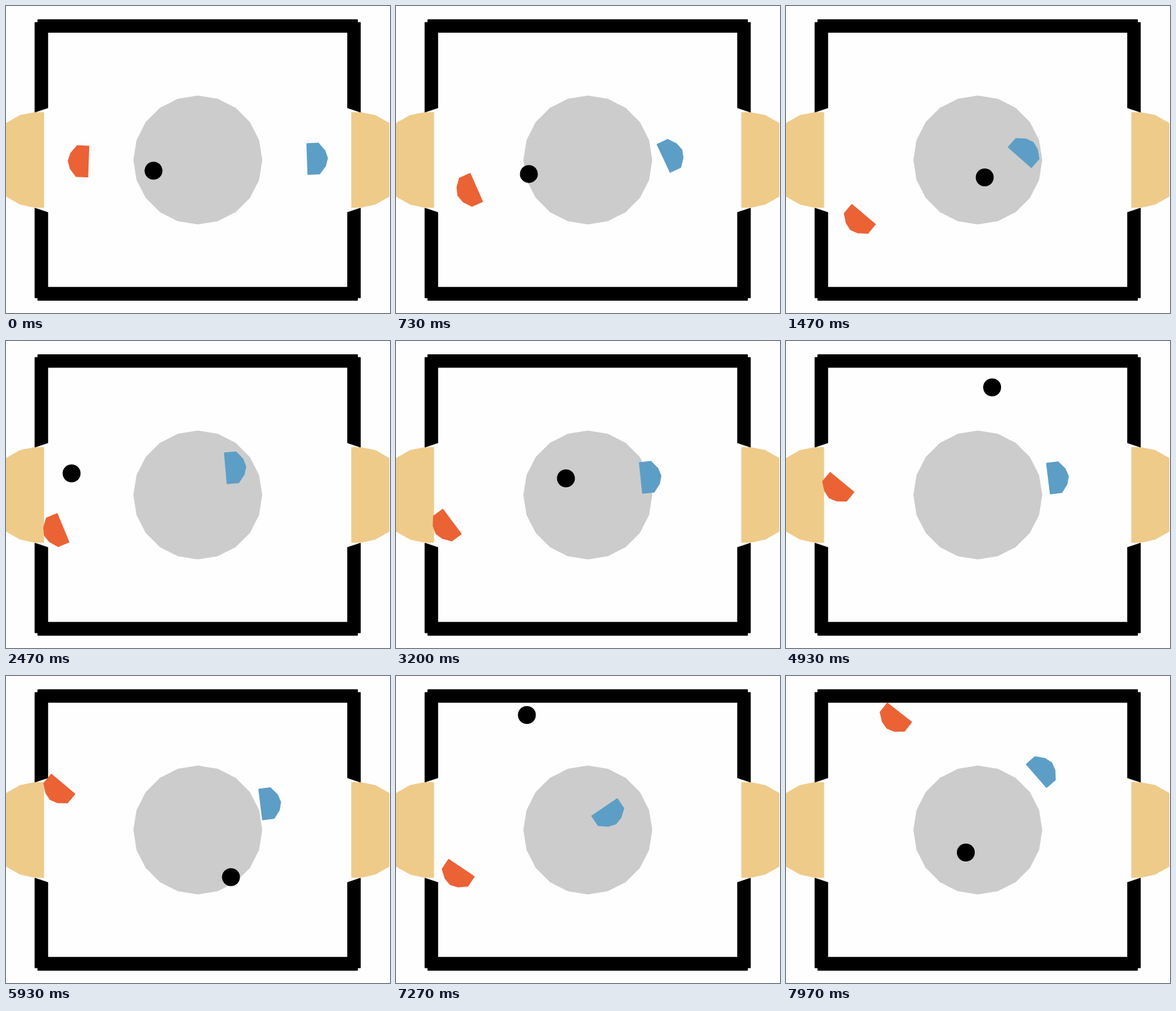
An HTML page for the animation above (8000 ms loop, 600 by 480 pixels).

```html
<!DOCTYPE html>
<html lang="en">
<head>
<meta charset="utf-8">
<title>Table hockey</title>
<style>
  html, body { margin: 0; width: 100%; height: 100%; overflow: hidden; background: #fefefe; }
  svg { display: block; width: 100vw; height: 100vh; }
</style>
</head>
<body>
<svg viewBox="0 0 600 480" preserveAspectRatio="none" stroke-width="1.6" stroke-linejoin="round">
  <defs>
    <g id="side">
      <path fill="#efcb8a" d="M59.5 166H45L22 170.5L0 183V298L22 310.500L45 315.500H59.500Z"/>
      <path stroke="#000" d="M45.500 26H65V159L45.500 165.500ZM45.500 316.500L65 323V456H45.500Z"/>
    </g>
    <path id="racket" d="M-12 24H6V-24H-12L-21.600 -12L-25.200 0L-21.600 12Z"/>
  </defs>
  <polygon id="circle" fill="#ccc"/>
  <use href="#side"/>
  <use href="#side" transform="matrix(-1 0 0 1 599 0)"/>
  <path stroke="#000" d="M50 21.500H549V41H50ZM50 440H549V460H50Z"/>
  <use id="orange" href="#racket" fill="#eb6235" stroke="#eb6235"/>
  <use id="blue" href="#racket" fill="#5d9ec7" stroke="#5d9ec7"/>
  <circle id="puck" r="14"/>
</svg>
<script>
const LOOP = 8000;
const RINK = { x: [80, 400], y: [56, 425] };
const el = id => document.getElementById(id);

// Where the puck is at a time, and how many bounces follow on each axis;
// a negative count heads for the left or the top first.
const shots = [
  { t: 0, x: 230.5, y: 257.5, bx: -2, by: 0 },
  { t: 1470, x: 310.5, y: 268, bx: 0, by: 1 },
  { t: 2470, x: 102.5, y: 207, bx: -3, by: 0 },
  { t: 3930, x: 371.5, y: 222.5, bx: 3, by: 0 },
  { t: 5040, x: 240, y: 56, bx: -1, by: 1 },
  { t: 5930, x: 351.5, y: 314.5, bx: 2, by: -2 },
  { t: 7270, x: 204.5, y: 61, bx: 1, by: -1 },
  { t: 7970, x: 281, y: 276 }
];

// Racket stops: x, y, angle.
const stops = [0, 1470, 2470, 3930, 5930, 7270, 7970];
const orange = [
  [122.5, 243, 2], [117.3, 330.5, -50], [83.5, 294.5, -22.5], [81.9, 277.5, -51],
  [85.3, 173.7, -50], [98.9, 305.2, -56], [173.5, 62, -52]
];
const blue = [
  [477, 239, -2], [369.3, 232.1, -48.5], [349.5, 198.5, -5], [428.2, 228.5, -7],
  [404, 200.2, -7], [329.2, 210.4, 56], [395.9, 152.2, -41]
];

// The index of the span that holds t, and the share of it gone by.
function span(times, t) {
  let i = 0;
  while (i < times.length - 2 && times[i + 1] < t) i++;
  return [i, (t - times[i]) / (times[i + 1] - times[i])];
}

// A straight run in mirrored space, folded back between lo and hi.
function bounce(from, to, count, [lo, hi], u) {
  const size = hi - lo;
  const image = count % 2 ? (count + 1) * size - (to - lo) : count * size + to - lo;
  const run = from - lo + (image - from + lo) * u;
  const turn = ((run % (2 * size)) + 2 * size) % (2 * size);
  return hi - Math.abs(turn - size);
}

function puckAt(t) {
  const [i, u] = span(shots.map(s => s.t), t);
  const a = shots[i], b = shots[i + 1];
  return [bounce(a.x, b.x, a.bx, RINK.x, u), bounce(a.y, b.y, a.by, RINK.y, u)];
}

function racketAt(path, t) {
  const [i, u] = span(stops, t);
  const ease = u * u * (3 - 2 * u);
  return path[i].map((v, k) => v + (path[i + 1][k] - v) * ease);
}

function place(id, [x, y, angle = 0], mirror = '') {
  el(id).setAttribute('transform', `translate(${x} ${y}) rotate(${angle}) ${mirror}`);
}

function draw(t) {
  place('puck', puckAt(t));
  place('orange', racketAt(orange, t));
  place('blue', racketAt(blue, t), 'scale(-1 1)');
}

el('circle').setAttribute('points', Array.from({ length: 20 }, (_, i) => {
  const a = i * Math.PI / 10;
  return [299.7 + 100.7 * Math.cos(a), 240.8 + 100.7 * Math.sin(a)];
}).join(' '));

const start = performance.now();
function tick() {
  // Thirty steps a second, on a 10 ms clock.
  const step = Math.floor(((performance.now() - start) % LOOP + 3.4) * 0.03);
  draw(Math.round(step % 240 * 10 / 3) * 10);
  requestAnimationFrame(tick);
}
tick();
</script>
</body>
</html>
```
